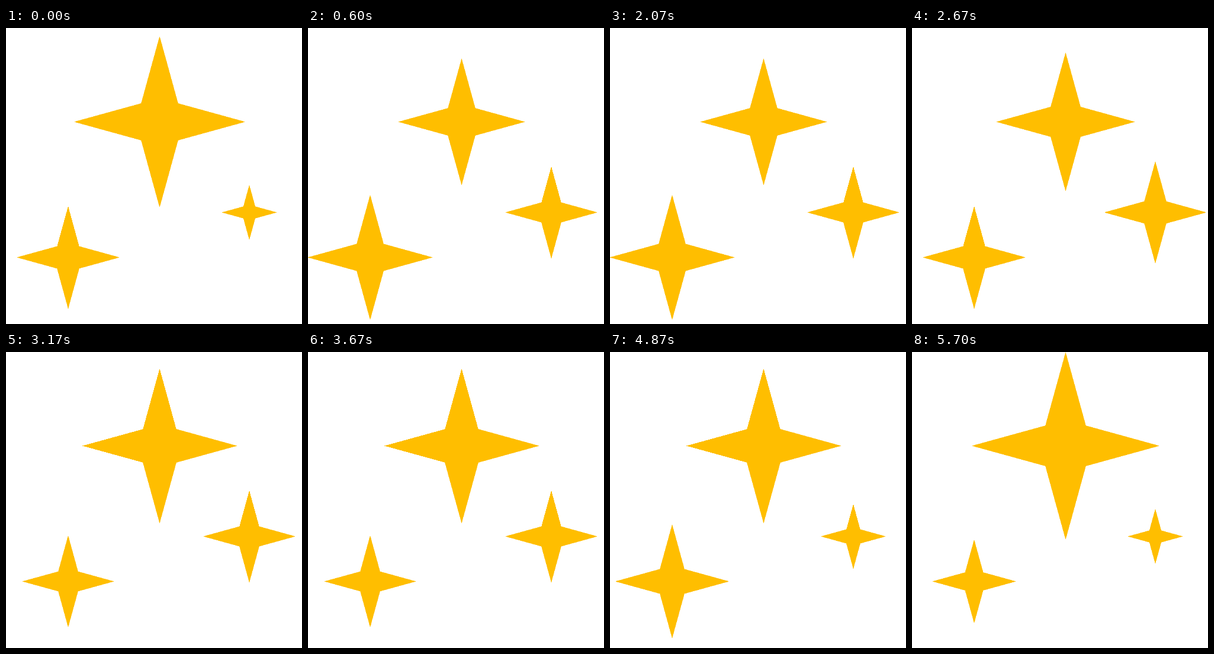
These frames come from a looping animation (500x500 px, 5.73 s). An HTML page:

```html
<!DOCTYPE html>
<html lang="en">
<head>
<meta charset="utf-8">
<title>Twinkling stars</title>
<style>
  html, body { margin: 0; width: 100%; height: 100%; overflow: hidden; background: #fff; }
  svg { display: block; width: 100%; height: 100%; }
</style>
</head>
<body>
<svg viewBox="0 0 500 500" fill="#ffbe00" stroke="#ffbe00" stroke-width="0.6"
     stroke-miterlimit="10" shape-rendering="crispEdges"></svg>
<script>
const LOOP = 5730;
const CYCLE = 12;                        // steps per pulse
const STEP_STARTS = [70, 100, 130, 170]; // five steps per 200 ms, the first one held longer
const INNER = 0.216;                     // inner corner offset relative to the tip

// peak: step of largest size
const stars = [
  { x: 259.5, y: 158.5, mean: 130, swing: 27.5, peak: -2 },
  { x: 105, y: 387.5, mean: 86, swing: 18.7, peak: 3 },
  { x: 411, y: 311.5, mean: 65.5, swing: 23, peak: 5 },
];

const svg = document.querySelector('svg');
for (const star of stars) {
  star.node = document.createElementNS('http://www.w3.org/2000/svg', 'polygon');
  svg.append(star.node);
}

function stepAt(ms) {
  const rest = ms % 200;
  return 5 * Math.floor(ms / 200) + STEP_STARTS.filter(start => start <= rest).length;
}

function radius({ mean, swing, peak }, step) {
  return mean + swing * Math.cos(2 * Math.PI * (step - peak) / CYCLE);
}

function starPoints({ x, y }, r) {
  const c = r * INNER;
  return [[0, -r], [c, -c], [r, 0], [c, c], [0, r], [-c, c], [-r, 0], [-c, -c]]
    .map(([dx, dy]) => `${(x + dx).toFixed(2)},${(y + dy).toFixed(2)}`)
    .join(' ');
}

function render(ms) {
  const step = stepAt(ms % LOOP);
  for (const star of stars) {
    star.node.setAttribute('points', starPoints(star, radius(star, step)));
  }
}

const begin = performance.now();
function tick() {
  render(performance.now() - begin);
  requestAnimationFrame(tick);
}
tick();
</script>
</body>
</html>
```
